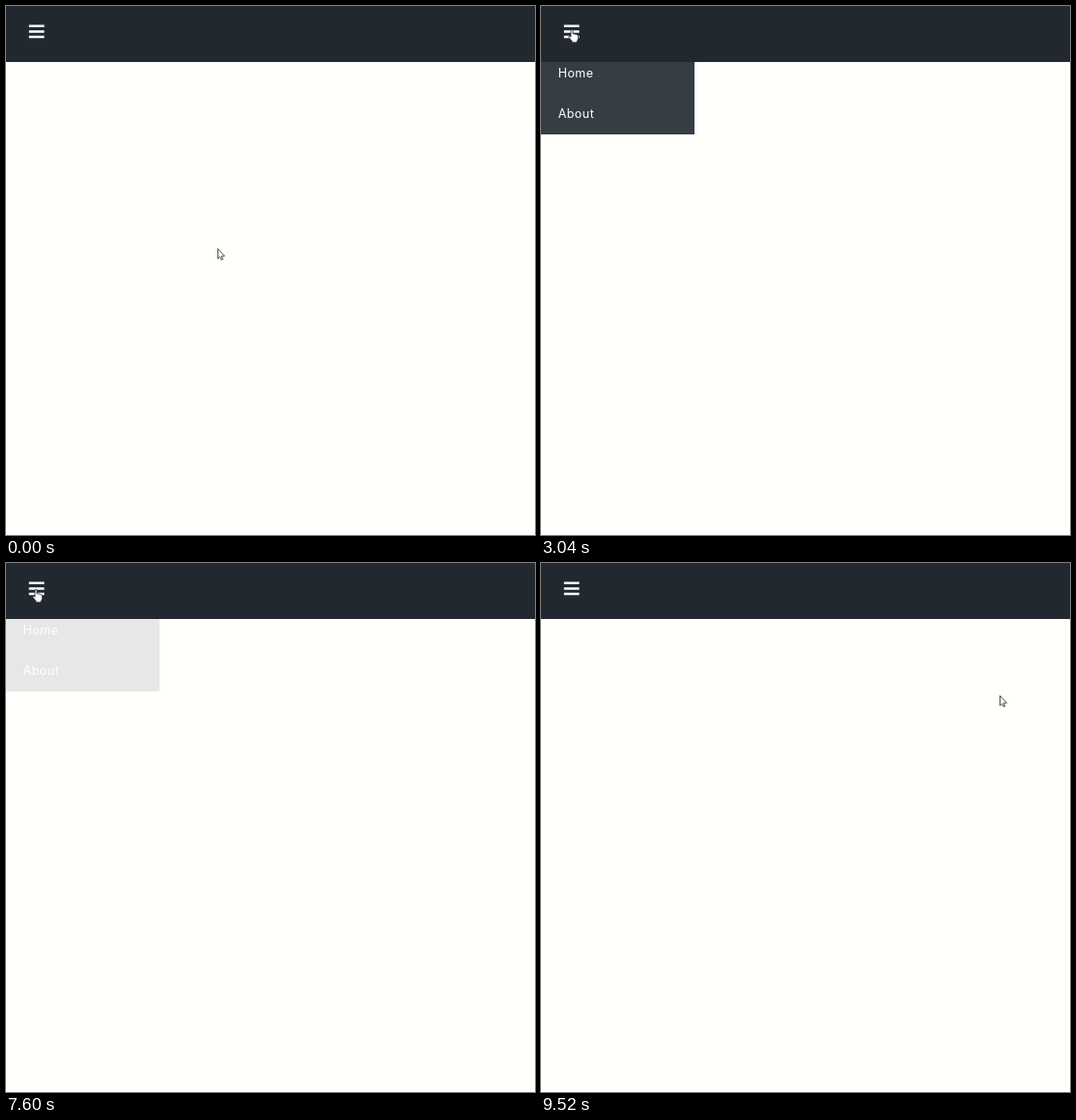
An HTML page for the animation above (9680 ms loop, 548 px wide and 548 px high).

```html
<!DOCTYPE html>
<html lang="en">
<head>
<meta charset="utf-8">
<title>Menu toggle</title>
<style>
  html, body { margin: 0; width: 100%; height: 100%; overflow: hidden; background: #fffffc; }
  svg { display: block; width: 548px; height: 548px; }
  text { font: 400 12.5px Inter, sans-serif; letter-spacing: .45px; fill: #fff; }
</style>
</head>
<body>
<svg viewBox="0 0 548 548">
  <g id="menu">
    <path fill="#373d44" d="M0 58h159v75H0z"/>
    <text x="17.7" y="74">Home</text>
    <text x="17.7" y="116">About</text>
  </g>
  <path fill="#212830" d="M0 0h548v58H0z"/>
  <path stroke="#fff" stroke-width="2.5" d="M23.8 20.8h15.8m-15.8 5.6h15.8m-15.8 5.6h15.8"/>
  <g id="cursor" fill="#fff" stroke-linejoin="round">
    <path id="arrow" stroke="#222" stroke-width=".8"
      d="M.5.5V10.8L2.8 8.7 4.3 12 5.7 11.4 4.3 8.1H7.5Z"/>
    <path id="hand" stroke="#212830" stroke-width=".8"
      d="M-1 1Q0-.4 1 1V4.8Q2.2 4.2 3 5.2 4.2 4.6 4.9 5.7 6.4 5.3 6.5 7V9.6Q6.3 11.6 5.2 12.4V13.8H.2V12.6Q-1.4 10.8-3.2 8.2-3.4 6.6-2 7.1L-1 8.2Z"/>
  </g>
</svg>
<script>
const LOOP = 9680, STEP = 80;
const el = id => document.getElementById(id);
const clamp = p => Math.max(0, Math.min(1, p));

const line = (x0, y0, x1, y1) => p => [x0 + (x1 - x0) * p, y0 + (y1 - y0) * p];

// One clockwise turn from the top; with inward = 1 it ends at the centre
const turn = (cx, cy, rx, ry, inward) => p => {
  const angle = (p - .25) * 2 * Math.PI, size = 1 - inward * p ** 6;
  return [cx + rx * size * Math.cos(angle), cy + ry * size * Math.sin(angle)];
};

// The pointer visits the icon, circles it three times and leaves
const moves = [
  { at: 560, run: 480, steps: 4, path: line(219, 251, 29, 4) },
  { at: 1360, run: 1200, steps: 9, path: turn(32, 24, 40, 27, 1) },
  { at: 5200, run: 1040, steps: 7, path: turn(34, 28, 37, 26, 1) },
  { at: 6480, run: 640, steps: 5, path: turn(31, 42, 20, 15, 0) },
  { at: 9280, run: 240, steps: 2, path: line(31, 27, 475, 137) }
];

function pointer(t) {
  const { at, run, steps, path } = moves.findLast(m => m.at <= t) || moves[0];
  const step = Math.floor((t - at) / run * (steps - 1) + 1);
  return path(clamp(step / steps));
}

function rise(t, start, length) {
  const p = clamp((t - start) / length);
  return p * p * (3 - 2 * p);
}

function menuOpacity(t) {
  if (t < 4560) return rise(t, 2930, 110);
  return rise(t, 7525, 360) - rise(t, 8600, 120);
}

function draw(now) {
  const t = Math.floor(now % LOOP / STEP) * STEP;
  const [x, y] = pointer(t);
  const overIcon = x > 22 && x < 42 && y > 17 && y < 36;
  el("cursor").setAttribute("transform", `translate(${Math.round(x)} ${Math.round(y)})`);
  el("hand").style.display = overIcon ? "" : "none";
  el("arrow").style.display = overIcon ? "none" : "";
  el("menu").style.opacity = menuOpacity(t);
}

const began = performance.now();
function tick() {
  draw(performance.now() - began);
  requestAnimationFrame(tick);
}
tick();
</script>
</body>
</html>
```
